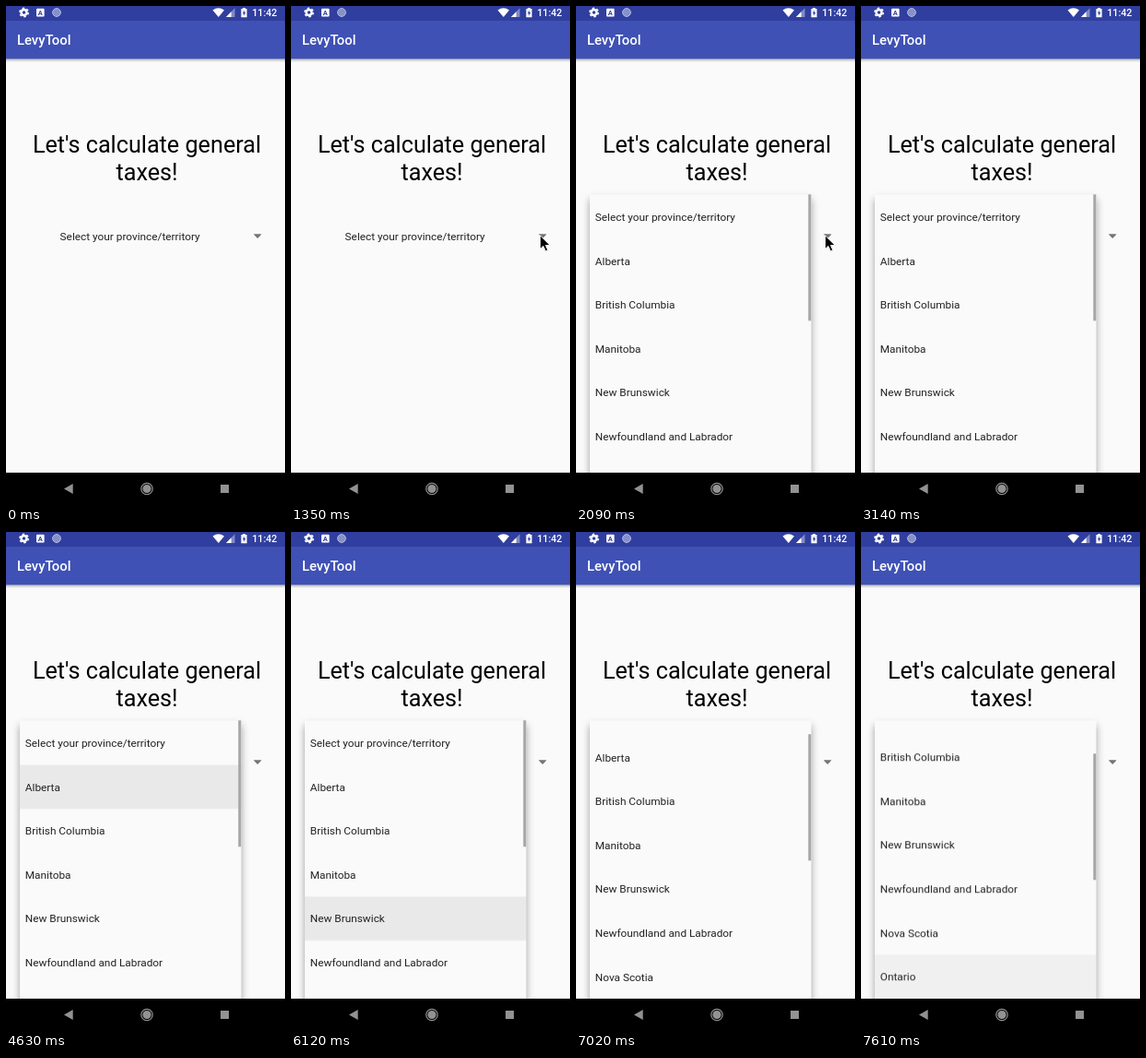
An HTML page for the animation above (8000 ms loop, 303 by 540 pixels).

```html
<!DOCTYPE html>
<html lang="en">
<head>
<meta charset="utf-8">
<title>Tax form</title>
<style>
html, body { margin: 0; width: 100%; height: 100%; overflow: hidden; background: #fafafa; }
svg { display: block; width: 100%; height: 100%; font-family: Roboto, Arial, sans-serif; }
.item { font-size: 11.83px; fill: #222; }
.head { font-size: 25.2px; text-anchor: middle; }
.panel { fill: #fafafa; }
#early .panel { filter: drop-shadow(0 3px 2.5px rgba(0,0,0,.32)); }
#menu .panel { filter: drop-shadow(0 5px 4.5px rgba(0,0,0,.36)); }
.bar { fill: #a6a6a6; }

#resize, #arrow, #ripple, #early, #menu, #hover, #list, #thumb, #fade {
  animation: 8s step-end infinite;
}
#resize, #ripple, #early, #menu, #arrow { opacity: 0; }
#resize { animation-name: resize; }
#arrow { animation-name: arrow; }
#ripple, #early { animation-name: early; }
#menu { animation-name: menu; }
#hover { animation-name: hover; }
#list { animation-name: list; }
#thumb { animation-name: thumb; }
#fade { animation-name: fade; }

@keyframes resize {
  0%, 9.375%, 100% { opacity: 0; }
  7.5% { opacity: 1; }
}
@keyframes arrow {
  0% { opacity: 0; transform: translate(296px, 242px); }
  9.375% { opacity: 1; transform: translate(296px, 242px); }
  11.25% { opacity: 1; transform: translate(297px, 243px); }
  13.125% { opacity: 1; transform: translate(282px, 247px); }
  15% { opacity: 1; transform: translate(273px, 248px); }
  16.875% { opacity: 1; transform: translate(270px, 248px); }
  39.25%, 100% { opacity: 0; transform: translate(270px, 248px); }
}
@keyframes early {
  0%, 26.125%, 100% { opacity: 0; }
  24.375% { opacity: 1; }
}
@keyframes menu {
  0% { opacity: 0; }
  26.125%, 100% { opacity: 1; }
}
/* row highlight: half strength, then full */
@keyframes hover {
  0% { opacity: 0; transform: translateY(47.6px); }
  57.875% { opacity: .07; transform: translateY(47.6px); }
  63.5% { opacity: .07; transform: translateY(95.2px); }
  69% { opacity: .04; transform: translateY(142.8px); }
  70.875% { opacity: .07; transform: translateY(142.8px); }
  74.625% { opacity: .04; transform: translateY(190.4px); }
  76.5% { opacity: .07; transform: translateY(190.4px); }
  82.125% { opacity: 0; transform: translateY(190.4px); }
  89.625% { opacity: .07; transform: translateY(285.6px); }
  95.125%, 100% { opacity: .04; transform: translateY(333.2px); }
}
@keyframes list {
  0% { transform: translateY(0); }
  82.125% { transform: translateY(-3px); }
  87.75% { transform: translateY(-32px); }
  95.125%, 100% { transform: translateY(-79.8px); }
}
@keyframes thumb {
  0% { transform: translateY(0); }
  82.125% { transform: translateY(1px); }
  87.75% { transform: translateY(15px); }
  95.125%, 100% { transform: translateY(36px); }
}
@keyframes fade {
  0%, 52.25%, 82.125%, 100% { opacity: 1; }
  44.875% { opacity: 0; }
  80.25% { opacity: .4; }
}
</style>
</head>
<body>
<svg viewBox="0 0 303 540" preserveAspectRatio="none">
  <defs>
    <linearGradient id="drop" x2="0" y2="1">
      <stop stop-color="#000" stop-opacity=".28"/>
      <stop offset="1" stop-color="#000" stop-opacity="0"/>
    </linearGradient>
    <clipPath id="window"><rect x="15" y="204.5" width="240.5" height="302"/></clipPath>
  </defs>

  <rect width="303" height="540" fill="#fafafa"/>
  <rect y="57" width="303" height="4" fill="url(#drop)"/>
  <rect y="16" width="303" height="41.3" fill="#3f51b5"/>
  <rect width="303" height="16" fill="#303f9f"/>
  <text x="12" y="42.3" font-size="14.8" font-weight="500" fill="#fff">LevyTool</text>

  <g id="status" fill="#fff">
    <circle cx="19.5" cy="7" r="3" fill="none" stroke="#fff" stroke-width="2.4"/>
    <circle cx="19.5" cy="7" r="4.7" fill="none" stroke="#fff" stroke-width="1.5" stroke-dasharray="2.46 2.46"/>
    <rect x="33" y="2.8" width="8.6" height="8.6" rx="1"/>
    <text x="37.3" y="9.8" font-size="7.5" font-weight="700" text-anchor="middle" fill="#303f9f">A</text>
    <circle cx="55" cy="7" r="4.4" fill="#8791c9" stroke="#b4bbe0" stroke-width="1"/>
    <path d="M224.5 4.6Q230.8 -.2 237 4.6L230.8 12Z"/>
    <path d="M248.5 2.2V12H239Z" fill-opacity=".4"/>
    <path d="M244.6 6.2V12H239Z"/>
    <path d="M257 2h3v1h1.6v9.2h-6.2V3H257Z"/>
    <path d="M259 4.6L256.9 8.2H258.2V10.8L260.3 7.1H259Z" fill="#303f9f"/>
    <text x="267.3" y="11" font-size="10.7" font-weight="500">11:42</text>
  </g>

  <text class="head" x="153" y="158.8">Let's calculate general</text>
  <text class="head" x="153" y="188.8">taxes!</text>
  <text class="item" x="58.6" y="254">Select your province/territory</text>
  <path d="M269 247.6h8.4l-4.2 4.2Z" fill="#757575"/>
  <circle id="ripple" cx="273" cy="249" r="14" fill="#e9e9e9"/>
  <path id="caret" d="M269 247.6h8.4l-4.2 4.2Z" fill="#757575"/>

  <g id="early">
    <rect class="panel" x="20" y="219" width="240.5" height="183.5"/>
    <g id="earlyRows"></g>
    <rect class="bar" x="257" y="219.5" width="3" height="77"/>
  </g>

  <g id="menu">
    <rect class="panel" x="15" y="204.5" width="240.5" height="325"/>
    <g clip-path="url(#window)">
      <g id="list">
        <rect id="hover" x="15" y="205" width="240.5" height="47.6" opacity="0"/>
        <g id="rows"></g>
      </g>
      <g id="fade"><rect id="thumb" class="bar" x="252.3" y="204.3" width="3" height="137"/></g>
    </g>
  </g>

  <path id="resize" d="M295.5 245.5l4-4v2.6H304v2.8h-4.5v2.6Z" stroke="#fff" stroke-width=".7"/>
  <g id="arrow">
    <path d="M.5 .8V15.6L4 12.4L6.4 17.8L8.9 16.7L6.6 11.5H11.3Z" stroke="#fff" stroke-width="1"
      style="filter:drop-shadow(0 .7px .6px rgba(0,0,0,.35))"/>
  </g>

  <rect y="506" width="303" height="34"/>
  <g fill="#929292">
    <path d="M63 523.5L72.7 518V529Z"/>
    <circle cx="153" cy="523.5" r="6.2" fill="none" stroke="#929292" stroke-width="1.2"/>
    <circle cx="153" cy="523.5" r="4.6"/>
    <rect x="233" y="519" width="9" height="9"/>
  </g>
</svg>
<script>
const names = ["Select your province/territory", "Alberta", "British Columbia", "Manitoba",
  "New Brunswick", "Newfoundland and Labrador", "Nova Scotia", "Ontario", "Prince Edward Island"];

function fill(id, items, x, y) {
  const group = document.getElementById(id);
  items.forEach((name, i) => {
    const text = document.createElementNS(group.namespaceURI, "text");
    text.setAttribute("class", "item");
    text.setAttribute("x", x);
    text.setAttribute("y", y + i * 47.6);
    text.textContent = name;
    group.append(text);
  });
}

fill("earlyRows", names.slice(1, 5), 25.6, 235.8);
fill("rows", names, 20.8, 233);
</script>
</body>
</html>
```
